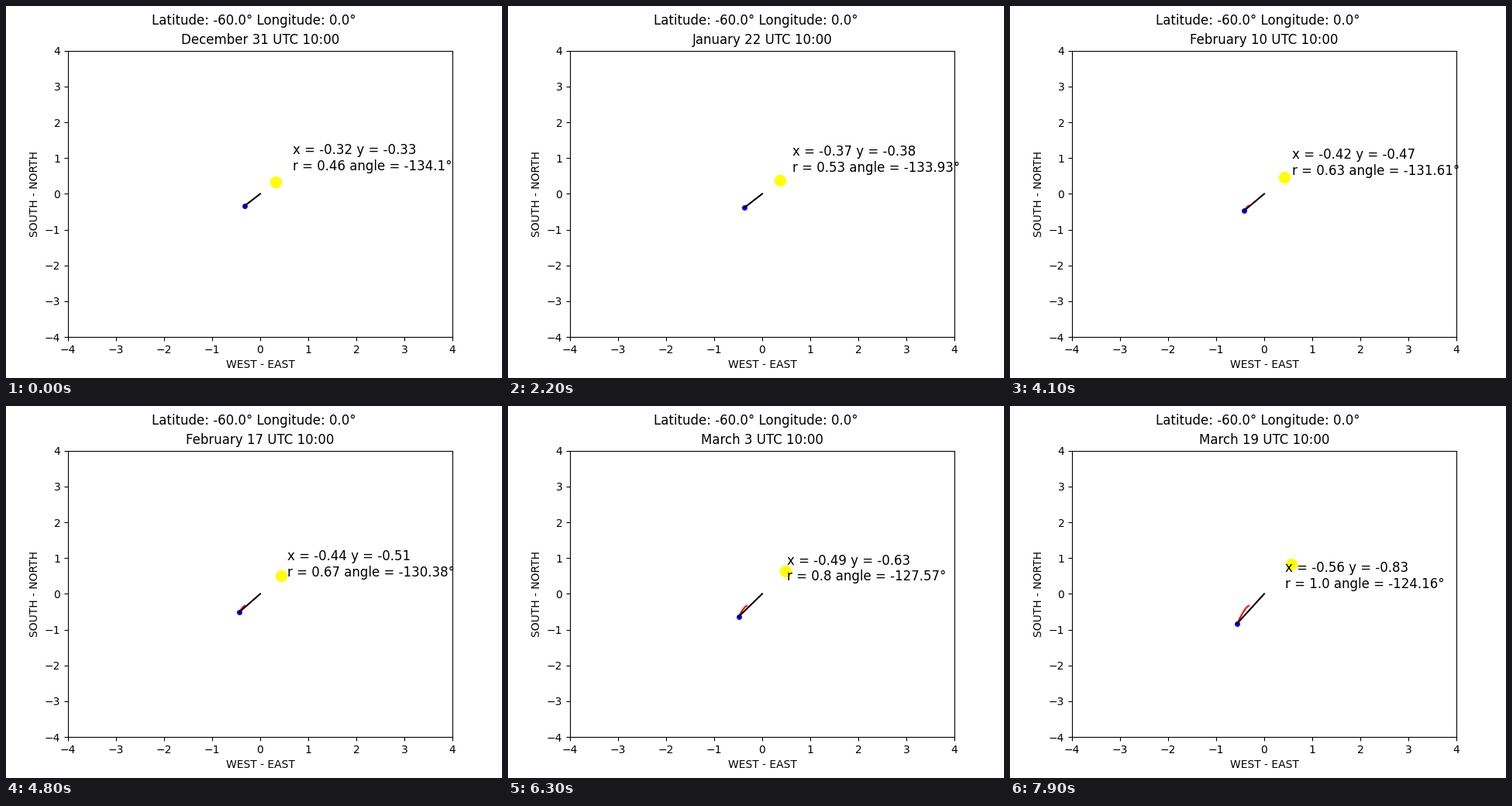
Animation, 640 px wide and 480 px high, one loop 8 s. Source, as a matplotlib script:

```python
import numpy as np
import matplotlib.pyplot as plt
from matplotlib.animation import FuncAnimation

LATITUDE, LONGITUDE = -60.0, 0.0
HOUR = 10
STICK = 0.5
TILT = np.radians(23.44)
YEAR, EQUINOX = 365.25, 80.26
DAYS = 80
MONTHS = [("December", 31), ("January", 31), ("February", 29), ("March", 31)]


def date_label(n):
    """Date n days after December 31 in a leap year."""
    day = 31 + n
    for name, length in MONTHS:
        if day <= length:
            return f"{name} {day} UTC {HOUR}:00"
        day -= length


def day_of_year(n):
    # February 29 shares day 60 with March 1
    if n == 0:
        return 365
    return n if n <= 60 else n - 1


def shadow(n):
    """Tip of the stick's shadow for a circular orbit: x east, y north."""
    lon = 2 * np.pi * (day_of_year(n) - EQUINOX) / YEAR
    ra = np.arctan2(np.cos(TILT) * np.sin(lon), np.cos(lon))
    dec = np.arcsin(np.sin(TILT) * np.sin(lon))
    lat = np.radians(LATITUDE)
    hour_angle = np.radians(15 * (HOUR - 12) + LONGITUDE) + lon - ra
    east = -np.cos(dec) * np.sin(hour_angle)
    north = (np.sin(dec) * np.cos(lat)
             - np.cos(dec) * np.sin(lat) * np.cos(hour_angle))
    up = (np.sin(dec) * np.sin(lat)
          + np.cos(dec) * np.cos(lat) * np.cos(hour_angle))
    return -STICK * east / up, -STICK * north / up


path = np.array([shadow(n) for n in range(DAYS)])

fig, ax = plt.subplots(figsize=(6.4, 4.8), dpi=100)
fig.suptitle(f"Latitude: {LATITUDE}° Longitude: {LONGITUDE}°")
ax.set(xlim=(-4, 4), ylim=(-4, 4),
       xlabel="WEST - EAST", ylabel="SOUTH - NORTH")
title = ax.set_title("")
trail, = ax.plot([], [], color="red")
tip, = ax.plot([], [], "o", color="blue", markersize=4)
stick, = ax.plot([], [], color="black")
sun, = ax.plot([], [], "o", color="yellow", markersize=10)
info = ax.text(0, 0, "", fontsize=12)


def update(n):
    x, y = map(float, path[n])
    r = float(np.hypot(x, y))
    angle = float(np.degrees(np.arctan2(y, x)))
    title.set_text(date_label(n))
    trail.set_data(path[:n + 1, 0], path[:n + 1, 1])
    tip.set_data([x], [y])
    stick.set_data([0, x], [0, y])
    sun.set_data([-x], [-y])
    info.set_position((x + 1, y + 1))
    info.set_text(f"x = {round(x, 2)} y = {round(y, 2)}\n"
                  f"r = {round(r, 2)} angle = {round(angle, 2)}°")
    return title, trail, tip, stick, sun, info


anim = FuncAnimation(fig, update, frames=DAYS, interval=100,
                     repeat=True, repeat_delay=0, blit=False)
plt.show()
```
